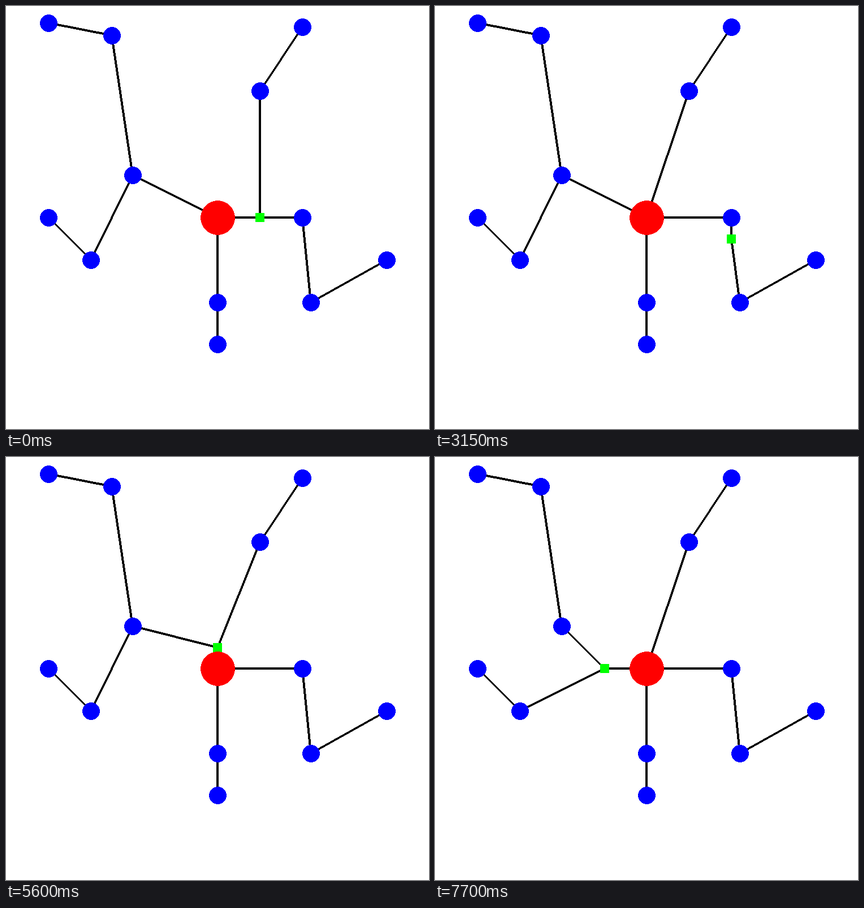
Animation of 748x748 px, one loop 8 s. Source, as an HTML page with a canvas:

```html
<!DOCTYPE html>
<html>
<head>
<meta charset="utf-8">
<style>
  html, body { margin: 0; width: 100%; height: 100%; overflow: hidden; background: #fff; }
  canvas { display: block; }
</style>
</head>
<body>
<canvas id="stage" width="748" height="748"></canvas>
<script>
const SIZE = 748, STEP = 350, LOOP = 8000;
const ctx = document.getElementById('stage').getContext('2d');

// Nodes in percent of the stage; the first is the hub.
const nodes = [
  [50, 50], [70, 50], [72, 70], [50, 70], [10, 4], [25, 7], [30, 40],
  [60, 20], [70, 5], [50, 80], [90, 60], [20, 60], [10, 50]
];

// Candidate points: midpoints of node pairs, in order.
const pairs = [];
nodes.forEach((a, i) => nodes.slice(i + 1).forEach(b => pairs.push([a, b])));
const midpoint = ([a, b]) => [(a[0] + b[0]) / 2, (a[1] + b[1]) / 2];

const px = v => Math.round(v * SIZE / 100);
const pxUp = v => Math.ceil(v * SIZE / 100 - 1e-6);

// Kruskal's minimum spanning tree; ties keep list order.
function spanningTree(points) {
  const edges = [];
  points.forEach((a, i) => points.forEach((b, j) => {
    if (i < j) edges.push({ i, j, d: (a[0] - b[0]) ** 2 + (a[1] - b[1]) ** 2 });
  }));
  edges.sort((a, b) => a.d - b.d);
  const group = points.map((_, i) => i);
  return edges.filter(({ i, j }) => {
    const from = group[j], to = group[i];
    if (from === to) return false;
    group.forEach((g, k) => { if (g === from) group[k] = to; });
    return true;
  });
}

// Hard-edged line, 4 px thick across its minor axis.
function line(a, b) {
  const [x, y] = a.map(px), dx = px(b[0]) - x, dy = px(b[1]) - y;
  const n = Math.max(Math.abs(dx), Math.abs(dy));
  const flat = Math.abs(dx) >= Math.abs(dy);
  for (let k = 0; k <= n; k++) {
    const u = Math.round(x + dx * k / n), v = Math.round(y + dy * k / n);
    if (flat) ctx.fillRect(u, v - 2, 1, 4);
    else ctx.fillRect(u - 2, v, 4, 1);
  }
}

function disc(p, r) {
  const [x, y] = p.map(px);
  for (let k = -r; k <= r; k++) {
    const w = Math.floor(Math.sqrt(r * r + r * 0.6 - k * k));
    ctx.fillRect(x - w, y + k, 2 * w + 1, 1);
  }
}

function draw(step) {
  const extra = midpoint(pairs[step]);
  const points = [extra, ...nodes];
  ctx.fillStyle = '#fff';
  ctx.fillRect(0, 0, SIZE, SIZE);
  ctx.fillStyle = '#000';
  spanningTree(points).forEach(e => line(points[e.i], points[e.j]));
  ctx.fillStyle = '#0f0';
  ctx.fillRect(pxUp(extra[0]) - 8, pxUp(extra[1]) - 8, 16, 16);
  ctx.fillStyle = '#00f';
  nodes.slice(1).forEach(p => disc(p, 15));
  ctx.fillStyle = '#f00';
  disc(nodes[0], 30);
}

const start = performance.now();
let shown = 0;
function tick() {
  const step = Math.floor((performance.now() - start) % LOOP / STEP);
  if (step !== shown) draw(shown = step);
  requestAnimationFrame(tick);
}
draw(0);
requestAnimationFrame(tick);
</script>
</body>
</html>
```
